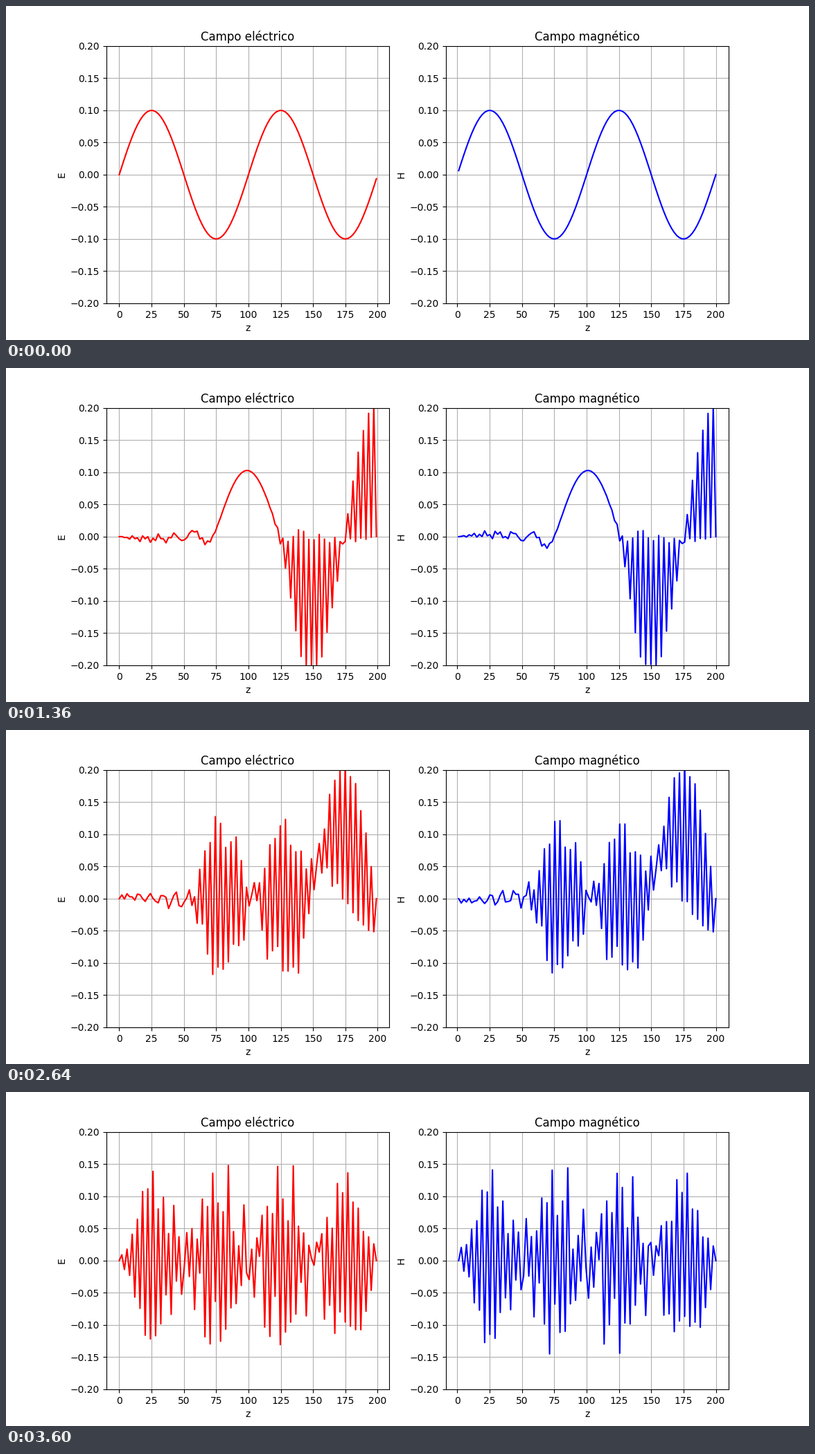
These frames come from a looping animation (1159x483 px, 3.64 s). A matplotlib script:

```python
import numpy as np
import matplotlib.pyplot as plt
from matplotlib.animation import FuncAnimation

WIDTH, HEIGHT, DPI = 1159, 483, 100
FRAMES, INTERVAL = 91, 40
STEPS_PER_FRAME = 11
COURANT = 0.1
AMPLITUDE, WAVELENGTH = 0.1, 100

# E and H live on alternating points of one grid.
z = np.linspace(0, 200, 200)
z_e, z_h = z[::2], z[1::2]


def wave(pos):
    return AMPLITUDE * np.sin(2 * np.pi * pos / WAVELENGTH)


def advance(field, other):
    """One explicit Euler step; both ends are held at zero."""
    new = np.zeros_like(field)
    new[1:-1] = field[1:-1] - COURANT / 2 * (other[2:] - other[:-2])
    return new


def simulate():
    e, h = wave(z_e), wave(z_h)
    states = [(e, h)]
    for _ in range(FRAMES - 1):
        for _ in range(STEPS_PER_FRAME):
            e, h = advance(e, h), advance(h, e)
        states.append((e, h))
    return states


def make_plot(ax, pos, color, title, label):
    line, = ax.plot(pos, wave(pos), color=color)
    ax.set_ylim(-0.2, 0.2)
    ax.set_title(title)
    ax.set_xlabel("z")
    ax.set_ylabel(label)
    ax.grid(True)
    return line


states = simulate()

# The tiny surplus keeps float rounding from losing a pixel.
fig, (ax_e, ax_h) = plt.subplots(
    1, 2, figsize=((WIDTH + 1e-6) / DPI, (HEIGHT + 1e-6) / DPI), dpi=DPI)
line_e = make_plot(ax_e, z_e, "red", "Campo eléctrico", "E")
line_h = make_plot(ax_h, z_h, "blue", "Campo magnético", "H")


def draw(frame):
    e, h = states[frame]
    line_e.set_ydata(e)
    line_h.set_ydata(h)
    return line_e, line_h


anim = FuncAnimation(fig, draw, frames=FRAMES, interval=INTERVAL,
                     repeat=True, repeat_delay=0)
plt.show()
```
